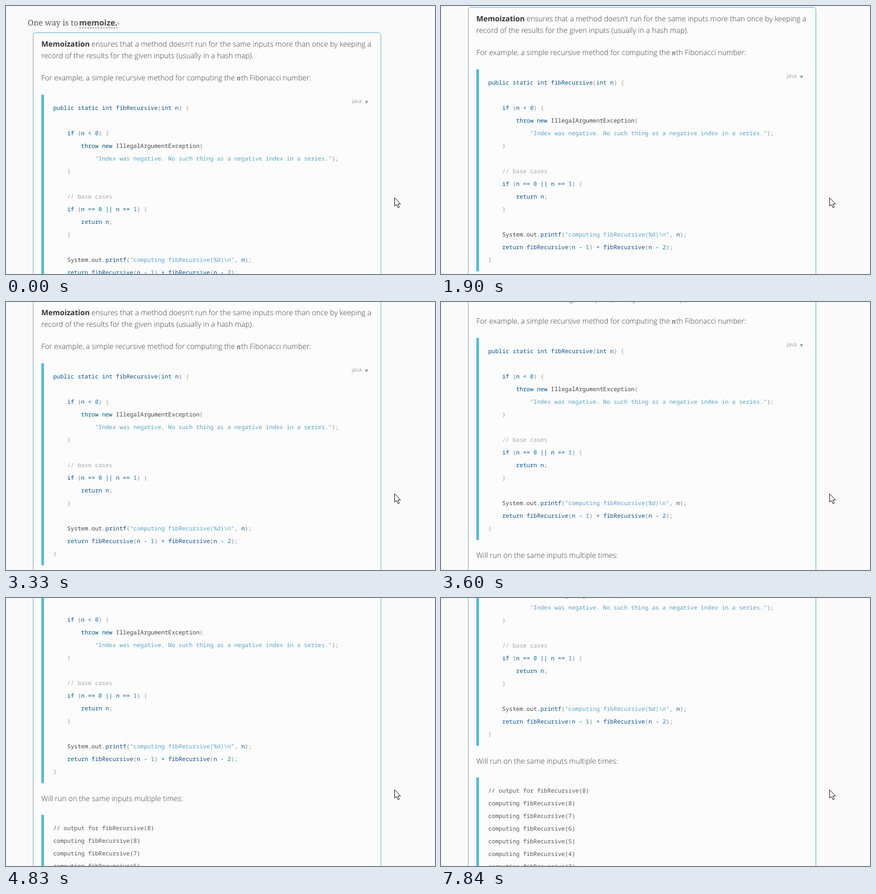
These frames come from a looping animation (813 px wide and 508 px high, 7990 ms). An HTML page:

```html
<!DOCTYPE html>
<html lang="en">
<head>
<meta charset="utf-8">
<title>Memoization</title>
<style>
  html, body { margin: 0; width: 100%; height: 100%; overflow: hidden; background: #fafafa; }
  svg { display: block; width: 813px; height: 508px; }
  text { white-space: pre; text-rendering: geometricPrecision; }
  .body { font: 300 14px "Open Sans", sans-serif; fill: #3c3c3c; }
  .body b, .strong { font-weight: 700; fill: #333; }
  .lead { font: 15px "Noto Serif", serif; fill: #555; }
  .link { font: 700 15px "Open Sans", sans-serif; fill: #444; }
  .math { font: italic 14px "Liberation Serif", serif; fill: #333; }
  .lang { font: 300 11px "Open Sans", sans-serif; fill: #777; }
  .code { font: 11px "Noto Sans Mono", monospace; fill: #444; }
  .output { fill: #555; }
  .keyword { fill: #00558a; }
  .name { fill: #0d4f8b; }
  .number { fill: #1583b5; }
  .string { fill: #5aa3c7; }
  .comment { fill: #a5a5a5; }
  .punct { fill: #858585; }
  .brace { fill: #a39f90; }
  .bar { fill: #55bbd6; }
</style>
</head>
<body>
<svg viewBox="0 0 813 508">
  <g id="page">
    <text class="lead" x="41" y="37">One way is to</text>
    <text class="link" x="138.5" y="37">memoize.</text>
    <path d="M139 41.5H211" stroke="#555" stroke-dasharray="3 2"/>
    <path d="M210.5 31.5q3 0 3 3M211.8 33l1.7 2 1.7-2" fill="none" stroke="#6bbfd4"/>

    <rect x="51.5" y="50.5" width="659" height="1000" rx="5" fill="#fcfcfc" stroke="#55b5cb"/>
    <path d="M51.5 56V1000" stroke="#83a0a8"/>

    <text class="body" x="67" y="77"><tspan class="strong">Memoization</tspan></text>
    <text class="body" x="162" y="77">ensures that a method doesn't run for the same inputs more than once by keeping a</text>
    <text class="body" x="67" y="99">record of the results for the given inputs (usually in a hash map).</text>
    <text class="body" x="67" y="141">For example, a simple recursive method for computing the</text>
    <text class="math" x="437.5" y="141">n</text>
    <text class="body" x="445.5" y="141">th Fibonacci number:</text>

    <rect class="bar" x="67" y="168" width="5" height="383"/>
    <text class="lang" x="655" y="184">java</text>
    <path d="M680 180h6.4l-3.2 5.4z" fill="#999"/>
    <g id="source"></g>

    <text class="body" x="67" y="585">Will run on the same inputs multiple times:</text>
    <rect class="bar" x="67" y="611" width="5" height="400"/>
    <g id="output"></g>
  </g>
  <path d="M736.5 363.5v16l3.7-3.4 2.7 6.2 2.5-1.1-2.7-6h5z" fill="#fff" stroke="#111"/>
</svg>
<script>
const SVG = "http://www.w3.org/2000/svg";
const LINE = 24, CHAR = 6.6, LEFT = 89.5;

const source = String.raw`public static int fibRecursive(int n) {

    if (n < 0) {
        throw new IllegalArgumentException(
            "Index was negative. No such thing as a negative index in a series.");
    }

    // base cases
    if (n == 0 || n == 1) {
        return n;
    }

    System.out.printf("computing fibRecursive(%d)\n", n);
    return fibRecursive(n - 1) + fibRecursive(n - 2);
}`.split("\n");

const output = ["// output for fibRecursive(8)"];
for (let n = 8; n > 1; n--) output.push(`computing fibRecursive(${n})`);

const rules = [
  ["comment", /^\/\/.*/],
  ["string", /^"[^"]*"/],
  ["keyword", /^(public|static|int|if|throw|new|return)\b/],
  ["name", /^(fibRecursive|printf|n)\b/],
  ["number", /^\d+/],
  ["keyword", /^(==|\|\||[<+-])/],
  ["brace", /^[{}]/],
  ["punct", /^[();,]/],
  ["", /^(\w+|\s+|.)/]
];

function make(tag, parent, attrs) {
  const el = document.createElementNS(SVG, tag);
  for (const key in attrs) el.setAttribute(key, attrs[key]);
  return parent.appendChild(el);
}

function addLine(parent, line, y, style) {
  const indent = line.search(/\S|$/);
  const text = make("text", parent, { class: style, x: LEFT + indent * CHAR, y });
  text.textContent = line.trim();
  return text;
}

function highlight(text) {
  let rest = text.textContent;
  text.textContent = "";
  while (rest) {
    const [kind, rule] = rules.find(([, re]) => re.test(rest));
    const token = rest.match(rule)[0];
    make("tspan", text, { class: kind }).textContent = token;
    rest = rest.slice(token.length);
  }
}

source.forEach((line, i) =>
  highlight(addLine(document.getElementById("source"), line, 197 + i * LINE, "code")));
output.forEach((line, i) =>
  addLine(document.getElementById("output"), line, 640 + i * LINE, "code output"));

// [time in ms, scroll position]; each position holds until the next
const LOOP = 7990;
const scroll = [
  [0, 0], [500, -46], [620, -50], [1900, 48], [2020, 50],
  [3330, 52], [3480, 94], [3600, 100], [3730, 102], [3850, 122], [4000, 150],
  [4560, 166], [4710, 198], [4830, 200],
  [5360, 206], [5510, 248], [5630, 250], [7840, 271], [LOOP, 271]
];

document.getElementById("page").animate(
  scroll.map(([time, y]) => ({
    offset: time / LOOP,
    transform: `translateY(${-y}px)`,
    easing: "steps(1, end)"
  })),
  { duration: LOOP, iterations: Infinity }
);
</script>
</body>
</html>
```
